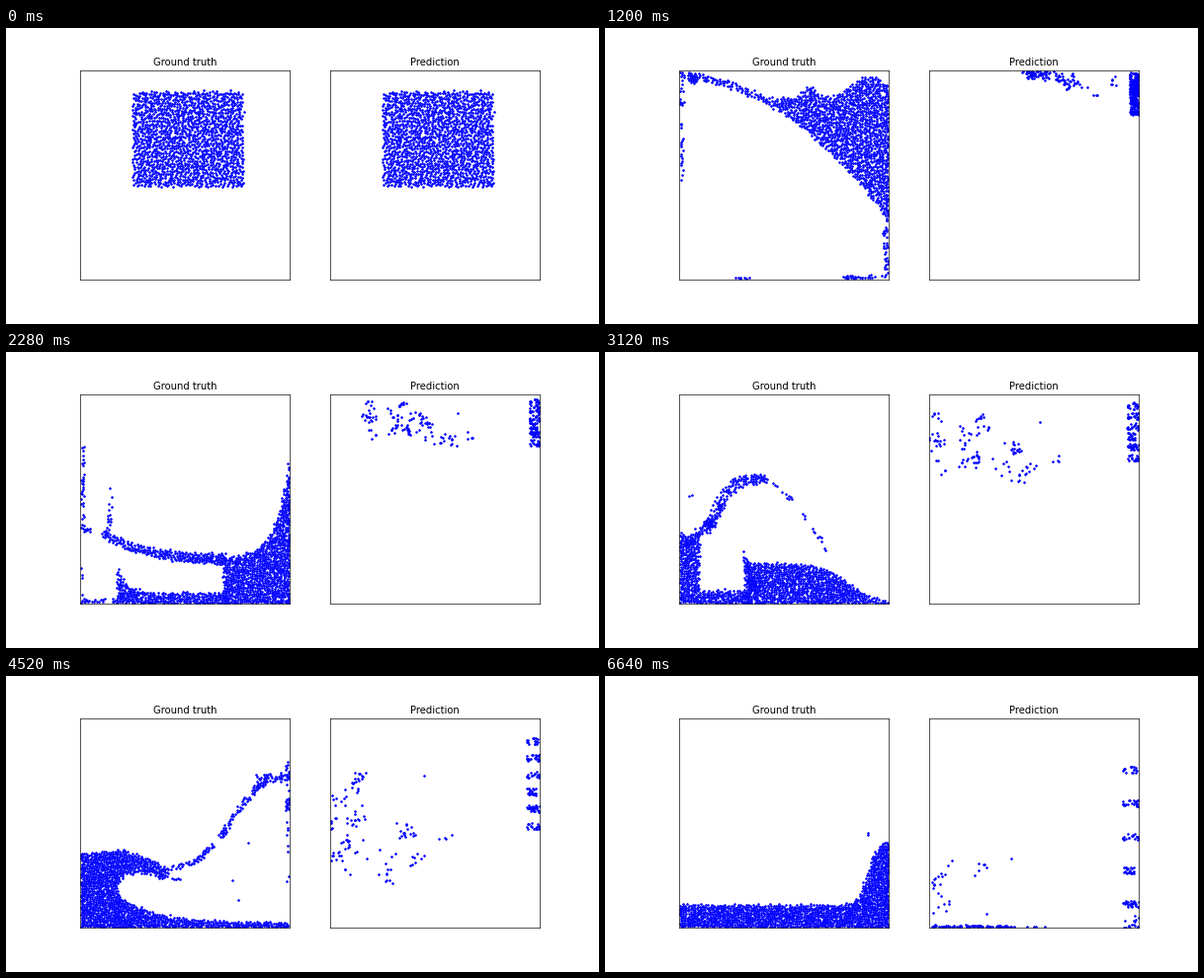
Animation of 600 by 300 pixels, one loop 6680 ms. Source, as a matplotlib script:

```python
import numpy as np
import matplotlib.pyplot as plt
from matplotlib.animation import FuncAnimation

W, H, FRAMES = 600, 300, 167
S = 212                   # side of each tank in pixels
N = 1550                  # particles per tank
SPLIT = 30                # from here on only stray predictions remain in view
rng = np.random.default_rng(7)


# Shapes: x runs from the left wall, heights from the floor

def bell(x, c, w):
    return np.exp(-((x - c) / w) ** 2)


def step(x, c, w):
    return 1 / (1 + np.exp((c - x) / w))


def decay(x, start, w):
    return np.exp((start - x) / w)


def evenly(n):
    k = np.arange(n)[:, None] * (0.75488, 0.56984)
    return (k + rng.random(2)) % 1


def fill(n, regions):
    """Spread n points evenly over regions (x0, x1, top, bottom)."""
    cols = []
    for x0, x1, top, bottom in regions:
        x = np.linspace(x0, x1, 200)
        low = np.maximum(bottom(x) if callable(bottom) else bottom + 0 * x, 0)
        high = np.minimum(top(x) if callable(top) else top + 0 * x, S)
        cols.append((x, low, np.maximum(high - low, 0), (x1 - x0) / 200 + 0 * x))
    x, low, thick, dx = np.hstack(cols)
    u, v = evenly(n).T
    cdf = np.cumsum(thick * dx)
    i = np.searchsorted(cdf, u * cdf[-1])
    p = np.column_stack([x[i], low[i] + thick[i] * v])
    return p + rng.normal(0, 0.8, (n, 2))


def box(n, x0, x1, y0, y1):
    return rng.uniform((x0, y0), (x1, y1), (n, 2))


def curve(n, x0, x1, fn, width):
    """Scatter n points along y = fn(x), evenly by length."""
    x = np.linspace(x0, x1, 200)
    y = fn(x)
    s = np.r_[0, np.cumsum(np.hypot(np.diff(x), np.diff(y)))]
    at = rng.random(n) * s[-1]
    line = np.column_stack([np.interp(at, s, x), np.interp(at, s, y)])
    return line + rng.uniform(-width / 2, width / 2, (n, 2))


def relax(p, gap=2.25, rounds=6):
    """Push apart points that overlap."""
    p = p.astype(np.float32)
    for _ in range(rounds):
        dx = p[:, 0, None] - p[:, 0]
        dy = p[:, 1, None] - p[:, 1]
        d = np.sqrt(dx * dx + dy * dy) + np.float32(1e-3)
        push = np.maximum(gap - d, 0) / d * np.float32(0.25)
        p[:, 0] += (dx * push).sum(1)
        p[:, 1] += (dy * push).sum(1)
    return p.astype(float)


def kd_order(p, axis=0):
    """Order points by repeated halving, so equal indices correspond."""
    if len(p) < 2:
        return p
    p = p[np.argsort(p[:, axis], kind="stable")]
    h = len(p) // 2
    return np.vstack([kd_order(p[:h], 1 - axis), kd_order(p[h:], 1 - axis)])


def pose(regions, *parts):
    """Water pose: the regions share the particles the parts leave over."""
    n = N - sum(map(len, parts))
    p = relax(np.vstack([fill(n, regions), *parts]))
    return kd_order(np.clip(p, 0.8, S - 0.8))


class Track:
    """Smooth motion of all particles through timed poses."""

    def __init__(self, *keys):
        times, poses = zip(*keys)
        self.t = np.array(times, float)
        self.p = np.array(poses)
        self.v = 0.6 * np.gradient(self.p, self.t, axis=0)

    def at(self, f):
        i = int(np.clip(np.searchsorted(self.t, f, "right") - 1,
                        0, len(self.t) - 2))
        dt = self.t[i + 1] - self.t[i]
        s = (f - self.t[i]) / dt
        e = s * s * (3 - 2 * s)
        return (self.p[i] * (1 - e) + self.p[i + 1] * e
                + self.v[i] * dt * s * (1 - s) ** 2
                - self.v[i + 1] * dt * s * s * (1 - s))


# Water

block = pose([(53.5, 164.5, 191, 94.5)])

ceiling = pose([(17, S, S, lambda x: S - 8 - 66 * bell(x, 130, 70))])

spread = pose([(0, S, S, lambda x: S - 18 - 90 * (x / S) ** 2)],
              box(20, 1, 4, 155, 193), box(30, 207, 211, 50, 107))


def sheet_low(x):
    return 203 - 143 * (x / S) ** 2


def sheet_top(x):
    crest = (184 + 14 * bell(x, 60, 8) + 12 * bell(x, 132, 9)
             + 22 * bell(x, 192, 25))
    return np.maximum(crest, sheet_low(x) + 6)


sheet = pose([(9, S, sheet_top, sheet_low)],
             box(28, 1, 4, 100, 200), box(24, 1, 17, 200, S),
             box(32, 207, 211, 5, 65), box(26, 165, 211, 0, 4),
             box(7, 57, 77, 0, 1))

falling = pose([(3, S, lambda x: 135 - 45 * bell(x, 165, 55),
                 lambda x: 130 - 150 * (x / S) ** 1.5)],
               box(35, 1, 4, 70, 180), box(40, 15, 165, 0, 4))


def band(x):
    return 43 + 28 * decay(x, 23, 45)


wave = pose([(145, S, lambda x: 46 + 100 * decay(S, x, 14), 0),
             (23, 147, lambda x: band(x) + 3 + x / 60,
              lambda x: band(x) - 3 - x / 60),
             (37, 147, lambda x: 11 + 23 * decay(x, 38, 9), 0)],
            box(32, 1, 4, 75, 160), box(7, 1, 10, 73, 78),
            curve(18, 28, 32, lambda x: 71 + 46 * (x - 28) / 4, 3),
            box(22, 1, 35, 0, 5), box(4, 1, 2, 7, 39))

curl = pose([(67, S, lambda x: 41 * step(x, 172, -14), 0),
             (0, 20, lambda x: 72 - x / 2, 0),
             (20, 70, 13, 0)],
            curve(190, 5, 86, lambda x: 64 + 63 * step(x, 38, 8), 10),
            curve(24, 83, 149, lambda x: 127 - 74 * ((x - 83) / 66) ** 1.6, 3),
            curve(32, 63, 75, lambda x: 55 - 3.3 * (x - 63), 4),
            box(2, 1, 14, 105, 113))

slosh = pose([(0, S, lambda x: 44 + 10 * np.cos(2 * np.pi * x / S), 0)],
             box(40, 207, 211, 55, 115),
             curve(40, 35, 155, lambda x: 57 + 13 * bell(x, 85, 35), 8))

breaker = pose([(0, 38, lambda x: 75 + 3 * x / 38, 0),
                (38, 88, lambda x: 79 - 20 * ((x - 38) / 50) ** 1.5,
                 lambda x: 56 - 8 * bell(x, 38, 6) - 7 * bell(x, 88, 15)),
                (38, S, lambda x: 5 + 28 * decay(x, 38, 35), 0)],
               curve(115, 80, 189, lambda x: 58 + 102 * step(x, 153, 17), 5),
               box(38, 177, 211, 148, 156), box(26, 208, 211, 105, 169),
               box(7, 209, 211, 45, 105), box(5, 93, 105, 49, 51),
               box(3, 150, 185, 25, 140))

mound = pose([(0, S, lambda x: (38 * step(x, 110, -9) + 9 * bell(x, 60, 35)
                                + 22 * bell(x, 170, 40)), 0)],
             box(45, 207, 211, 15, 100),
             curve(18, 187, 193, lambda x: 17 + 4 * (x - 187), 3))

rest = pose([(0, S, lambda x: 23 + 65 * step(x, 191, 5), 0)],
            box(2, 187, 194, 89, 95))

water = Track((0, block), (9, ceiling), (17, spread), (30, sheet),
              (43, falling), (57, wave), (78, curl), (95, slosh),
              (113, breaker), (137, mound), (166, rest))


# Prediction: a cluster slides down the right wall, small clumps drift left

cluster = rng.random((270, 4))
leaving = rng.random(270) < 0.5
size = rng.geometric(0.25, 26)
origin = 100 + 100 * rng.random(26) ** 2
launch = np.column_stack([
    origin, S - 2 - 0.45 * (origin - 100) * rng.random(26),
    rng.uniform(-3, -0.6, 26), rng.uniform(-0.2, 1.2, 26)])
clump = np.repeat(launch, size, axis=0)
wobble = rng.normal(0, 1, (len(clump), 2))


def stray(f):
    t = f - SPLIT
    T = t / (FRAMES - 1 - SPLIT)

    q, depth, pile, _ = cluster.T
    rank = np.floor(6 * q)
    y = S - 2 - 43 * q - T * T * (46 + 27 * rank)
    y = np.maximum(y, 14 * pile ** 2)
    x = S - 9 * depth * (1 + 0.8 * T) + leaving * 0.5 * t
    wall = np.column_stack([x, y])

    x0, y0, vx, vy = clump.T
    x = x0 + vx * 60 * (1 - np.exp(-t / 60))
    y = y0 - vy * t - 0.008 * t * t
    free = np.column_stack([x, y]) + wobble * (3 + 0.02 * t)
    free[:, 0] = np.abs(free[:, 0])
    free[:, 1] = np.clip(free[:, 1], 0.5 + np.abs(wobble[:, 1]), S - 1)
    return np.vstack([wall, free])


remain = stray(SPLIT)
lost = box(N - len(remain), 50, 230, 240, 420)
escape = Track((0, block), (9, block + (22, 48)), (17, block + (40, 92)),
               (SPLIT, kd_order(np.vstack([remain, lost]))))


# Figure

fig = plt.figure(figsize=(10, 5), dpi=60, facecolor="white")


def panel(left, title):
    ax = fig.add_axes([left / W, 45 / H, S / W, S / H])
    ax.set(xlim=(0, S), ylim=(0, S), xticks=[], yticks=[])
    ax.set_title(title, fontsize=12, fontfamily="DejaVu Sans")
    return ax.plot([], [], "o", ms=2, color="blue")[0]


truth = panel(75, "Ground truth")
guess = panel(328, "Prediction")
margin = rng.uniform(0.5, 2, (N, 1))


def draw(f):
    truth.set_data(*np.clip(water.at(f), margin, S - margin).T)
    guess.set_data(*(escape.at(f) if f < SPLIT else stray(f)).T)
    return truth, guess


anim = FuncAnimation(fig, draw, frames=FRAMES, interval=40, repeat=True,
                     repeat_delay=0, init_func=lambda: draw(0))
plt.show()
```
